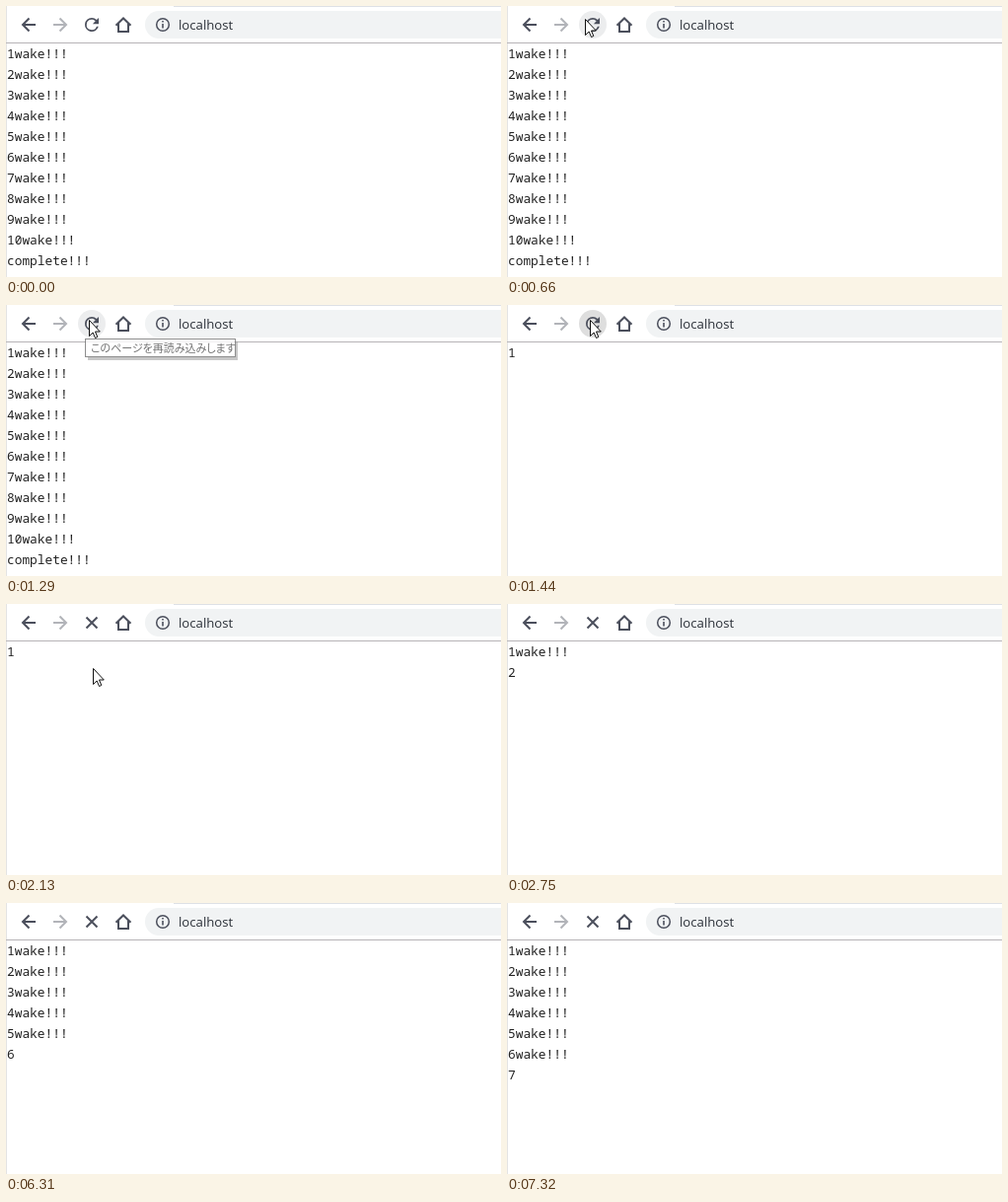
Recreate the animation shown at these times as an HTML page. Size 502 px wide and 275 px high, loop 8 s.

```html
<!DOCTYPE html>
<html lang="ja">
<head>
<meta charset="utf-8">
<title>localhost</title>
<style>
  html, body { margin: 0; width: 100%; height: 100%; overflow: hidden; background: #fff; }
  svg { display: block; width: 502px; height: 275px; }
  .icon { fill: none; stroke: #4b4f5c; stroke-width: 2; }
  .off { stroke: #b2b4b9; }
  .url { font: 13.2px "Open Sans", sans-serif; fill: #2b3038; }
  #lines { font: 12.83px "Noto Sans Mono", monospace; fill: #222; }
  #tip text { font: 11px "Noto Sans CJK JP", "Noto Sans CJK", sans-serif; font-feature-settings: "palt"; fill: #575757; }
</style>
</head>
<body>
<svg viewBox="0 0 502 275">
  <path d="M170 .5H502" stroke="#dee1e6"/>
  <path d="M.5 0V275" stroke="#e4e4e4"/>
  <path d="M0 37.5H502" stroke="#b6b4b6"/>
  <rect x="141" y="5" width="400" height="28" rx="14" fill="#f1f3f4"/>

  <circle id="halo" cx="87" cy="19"/>
  <path class="icon" d="M30 19H17.5M23.5 12.5L17 19L23.5 25.5"/>
  <path class="icon off" d="M48 19H60.500M54.500 12.500L61 19L54.500 25.500"/>
  <path id="reload" fill="#4b4f5c" transform="translate(76.500 8.500) scale(.875)"
    d="M17.65 6.35A7.96 7.96 0 0 0 12 4a8 8 0 1 0 7.73 10h-2.08A6 6 0 1 1 12 6c1.66 0 3.14.69 4.22 1.78L13 11h7V4z"/>
  <path id="stop" class="icon" d="M81.500 13.500L92.500 24.500M92.500 13.500L81.500 24.500"/>
  <path class="icon" d="M111.500 19.800L119 12.500L126.500 19.800M114 18V26H124V18"/>
  <circle class="icon" cx="159" cy="19" r="6.300" style="stroke-width:1.500"/>
  <path class="icon" d="M159 18V22.500M159 15V16.600" style="stroke-width:1.600"/>
  <text class="url" x="175" y="24">localhost</text>

  <g id="lines"></g>

  <g id="tip">
    <rect x="83" y="37" width="152" height="19" fill="#a0a0a0" opacity=".7"/>
    <rect x="80.500" y="34.500" width="152" height="18" fill="#fff" stroke="#767676"/>
    <text x="86" y="48">このページを再読み込みします</text>
  </g>
  <path id="cursor" d="M.5 .5V16.500L4.200 13L6.500 18.500L8.800 17.500L6.500 12H11.300Z" fill="#fff" stroke="#111"/>
</svg>
<script>
  const LOOP = 8000, TICK = 76, START = 70, CLICK = 1360, GONE = 2730;
  const wakeTimes = [CLICK, 2360, 3360, 4370, 5300, 6310, 7320];
  // Pointer waypoints: time, x, y
  const route = [
    [70, 386, 262], [220, 270, 165], [370, 160, 80], [520, 92, 24], [600, 79, 13],
    [820, 84, 15], [1525, 84, 15], [1750, 92, 26], [1980, 95, 50], [2360, 75, 90],
    [2520, 100, 150], [2690, 168, 270]
  ];
  const $ = id => document.getElementById(id);
  const show = (el, on) => { el.style.display = on ? '' : 'none'; };

  const rows = Array.from({ length: 11 }, (_, i) => {
    const row = document.createElementNS($('lines').namespaceURI, 'text');
    row.setAttribute('x', 1);
    row.setAttribute('y', 53 + 21 * i);
    return $('lines').appendChild(row);
  });

  function pointerAt(t) {
    const next = route.findIndex(p => p[0] > t);
    if (next < 1) return (next ? route[route.length - 1] : route[0]).slice(1);
    const [t0, x0, y0] = route[next - 1], [t1, x1, y1] = route[next];
    const k = (t - t0) / (t1 - t0);
    return [Math.round(x0 + (x1 - x0) * k), Math.round(y0 + (y1 - y0) * k)];
  }

  function rowText(i, count) {
    if (i >= count) return '';
    if (i === 10) return 'complete!!!';
    return (i + 1) + (i < count - 1 ? 'wake!!!' : '');
  }

  function draw(t) {
    const step = START + Math.floor((t - START) / TICK) * TICK;
    const [x, y] = pointerAt(step);
    const visible = t >= START && step < GONE;
    const hover = visible && Math.hypot(x - 87, y - 19) < 14;
    const loading = t >= CLICK;
    const pressed = loading && t < CLICK + 70;

    show($('cursor'), visible);
    $('cursor').setAttribute('transform', `translate(${x} ${y})`);

    show($('halo'), hover);
    $('halo').setAttribute('r', pressed ? 16 : 14);
    $('halo').setAttribute('fill', pressed ? '#cbcccd' : loading ? '#dedede' : '#ecedee');
    show($('reload'), !loading || hover);
    show($('stop'), loading && !hover);

    show($('tip'), step >= 970 && !loading);
    $('tip').style.opacity = Math.min(1, 0.12 + (step - 970) / 450);

    const count = loading ? wakeTimes.filter(w => t >= w).length : rows.length;
    rows.forEach((row, i) => {
      const text = rowText(i, count);
      if (row.textContent !== text) row.textContent = text;
    });
  }

  const begin = performance.now();
  function frame() {
    draw((performance.now() - begin) % LOOP);
    requestAnimationFrame(frame);
  }
  frame();
</script>
</body>
</html>
```
